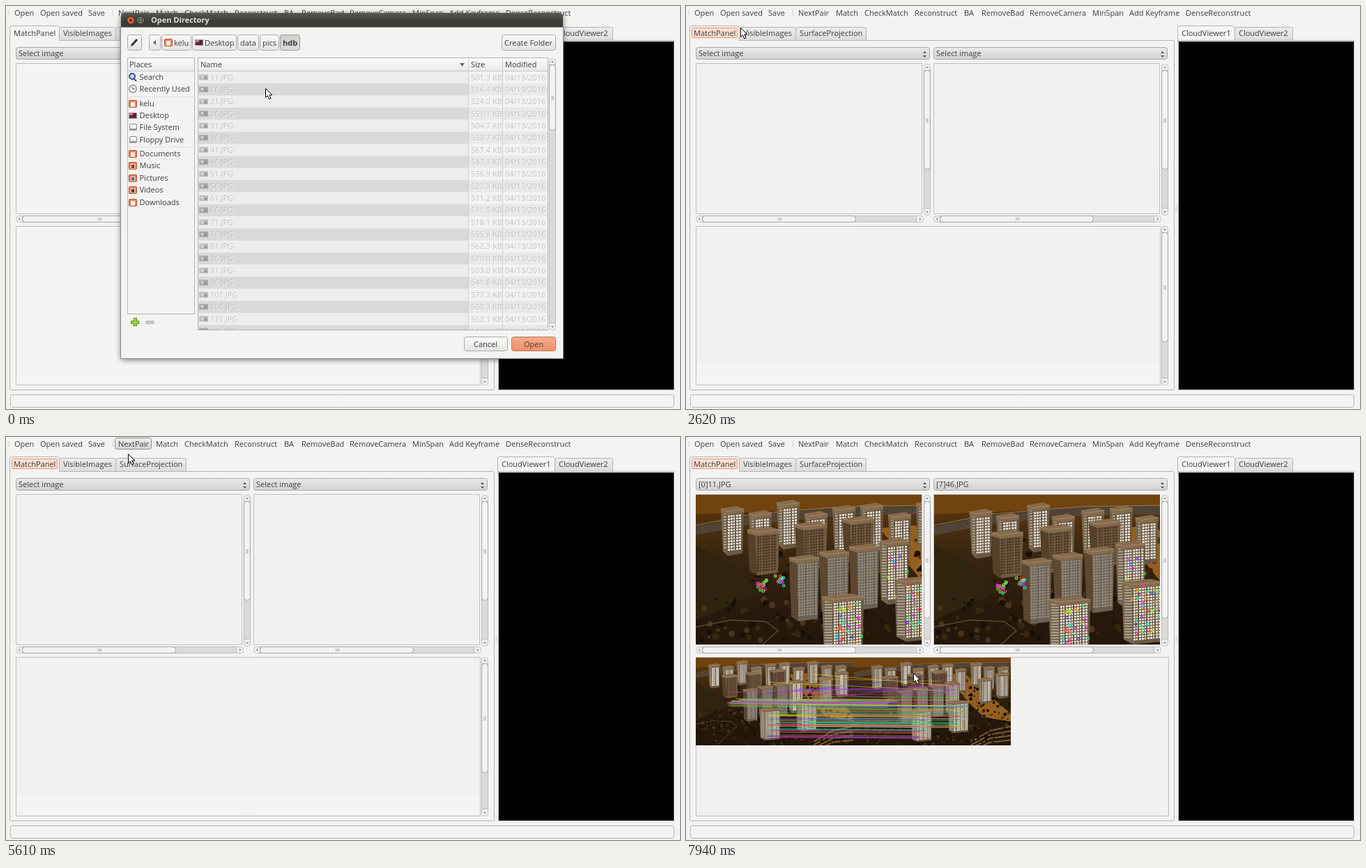
An HTML page with a canvas for the animation above (8 s loop, 967 by 579 pixels).

```html
<!DOCTYPE html>
<html lang="en">
<head>
<meta charset="utf-8">
<title>Match panel</title>
<style>
html, body { margin: 0; width: 100%; height: 100%; overflow: hidden; background: #f4f3f2; }
canvas { display: block; }
</style>
</head>
<body>
<canvas id="stage" width="967" height="579"></canvas>
<script>
const LOOP = 8000, TICK = 135.7;
const PRESSED = 870, OPENED = 1530, LOADED = 5740, MATCHED = 7360;
const main = document.getElementById('stage').getContext('2d');
let g = main;

// --- drawing helpers -------------------------------------------------------
function random(seed) {
  return () => (seed = (seed * 16807) % 2147483647) / 2147483647;
}
function fill(x, y, w, h, color) {
  g.fillStyle = color;
  g.fillRect(x, y, w, h);
}
function path(p) {
  g.beginPath();
  for (let i = 0; i < p.length; i += 2) g.lineTo(p[i], p[i + 1]);
}
function poly(color, ...p) {
  path(p);
  g.fillStyle = color;
  g.fill();
}
function stroke(color, width, ...p) {
  path(p);
  g.strokeStyle = color;
  g.lineWidth = width;
  g.stroke();
}
function disc(x, y, r, color) {
  g.beginPath();
  g.arc(x, y, r, 0, 7);
  g.fillStyle = color;
  g.fill();
}
function shade(y0, y1, ...colors) {
  const s = g.createLinearGradient(0, y0, 0, y1);
  colors.forEach((c, i) => s.addColorStop(i / (colors.length - 1), c));
  return s;
}
function box(x0, y0, x1, y1, color, line, r = 0) {
  g.beginPath();
  g.roundRect(x0 + .5, y0 + .5, x1 - x0 - 1, y1 - y0 - 1, r);
  if (color) { g.fillStyle = color; g.fill(); }
  if (line) { g.strokeStyle = line; g.lineWidth = 1; g.stroke(); }
}
function clip(x, y, w, h, paint) {
  g.save();
  g.beginPath();
  g.rect(x, y, w, h);
  g.clip();
  paint();
  g.restore();
}
const font = weight => g.font = weight + ' 11px "Open Sans", "Noto Sans", sans-serif';
function width(s, weight = 400) {
  font(weight);
  return Math.round(g.measureText(s).width);
}
// y is the middle of the line
function text(s, x, y, color = '#3c3c3c', weight = 400) {
  font(weight);
  g.fillStyle = color;
  g.fillText(s, x, y + 4);
}
function button(x0, y0, x1, y1, top = '#fbfbfa', end = '#e4e3e1', line = '#aaa8a5') {
  box(x0, y0, x1, y1, shade(y0, y1, top, end), line, 3);
}
function header(x, w) {
  fill(x, 75, w, 19, shade(75, 94, '#fbfbfa', '#e9e8e6'));
  fill(x, 93, w, 1, '#c8c6c3');
}
// scroll bar of the given length, thumb from a to b
function bar(x, y, length, a, b, upright) {
  const part = (u, lu, ...style) => upright
    ? box(x, y + u, x + 10, y + u + lu, ...style)
    : box(x + u, y, x + u + lu, y + 10, ...style);
  const arrow = (u, d) => upright
    ? poly('#777', x + 3, y + u, x + 7, y + u, x + 5, y + u + d)
    : poly('#777', x + u, y + 3, x + u, y + 7, x + u + d, y + 5);
  part(0, length, '#efeeec', '#c3c1be', 4);
  part(9, length - 19, '#dcdad8', '#bfbdba');
  part(a, b - a, '#f3f2f0', '#a5a3a0', 4);
  for (const k of [-2, 0, 2]) {
    const m = Math.round((a + b) / 2) + k;
    upright ? fill(x + 3, y + m, 4, 1, '#aaa') : fill(x + m, y + 3, 1, 4, '#aaa');
  }
  arrow(6, -2);
  arrow(length - 6, 2);
}

// --- pointer: straight runs between key points, seen once per tick ----------
const route = [
  [0, 372, 118], [1, 655, 472], [5, 768, 483], [12, 768, 483], [14, 212, 300], [19, 78, 31],
  [25, 38, 10], [26, 38, 10], [27, 68, 11], [32, 178, 10], [40, 178, 10], [41, 175, 24],
  [42, 226, 169], [45, 214, 32], [47, 232, 9], [55, 232, 9], [58, 326, 339]
];
function place(tick) {
  const i = route.findIndex(p => p[0] >= tick);
  if (i < 1) return (i ? route[route.length - 1] : route[0]).slice(1);
  const [t0, x0, y0] = route[i - 1], [t1, x1, y1] = route[i], k = (tick - t0) / (t1 - t0);
  return [Math.round(x0 + (x1 - x0) * k), Math.round(y0 + (y1 - y0) * k)];
}
function arrow([x, y]) {
  g.save();
  g.translate(x + .5, y + .5);
  path([0, 0, 0, 13, 3, 10.3, 5.2, 15.5, 7.6, 14.5, 5.4, 9.4, 9.4, 9.4]);
  g.closePath();
  g.fillStyle = '#fff';
  g.fill();
  g.strokeStyle = '#000';
  g.lineWidth = 1;
  g.stroke();
  g.restore();
}

// --- model town, seen from two places ---------------------------------------
const TOWN_W = 448, TOWN_H = 250, SMALL = 226 / TOWN_W;
const rows = [
  { x: 36, y: 16, dx: 40, dy: 0, w: 33, h: 72, n: 10, look: 'lit' },
  { x: 74, y: 46, dx: 68, dy: -8, w: 46, h: 70, n: 3, look: 'brown' },
  { x: 350, y: 52, dx: 45, dy: -15, w: 40, h: 76, n: 2, look: 'lit' },
  { x: 134, y: 86, dx: 43, dy: -8, w: 43, h: 96, n: 4, look: 'grey' },
  { x: 181, y: 142, dx: 104, dy: -25, w: 60, h: 94, n: 2, look: 'lit' }
];
const looks = {
  brown: { wall: '#705a41', glass: '#4a3420', edge: '#55402a' },
  lit: { wall: '#6a5a45', glass: '#efece2', edge: '#75664f' },
  grey: { wall: '#6b6152', glass: '#938d80', edge: '#5c4730' }
};
const towers = rows.flatMap(r => Array.from({ length: r.n }, (_, i) => ({
  x: r.x + i * r.dx, y: r.y + i * r.dy + (r.n > 4 ? 9 * Math.sin(i * 2.4) : 0),
  w: r.w, h: r.h, look: r.x + i * r.dx > 250 ? 'lit' : r.look
})));
// nearer things slide left, farther things slide right
const shift = base => Math.max(-17, 13 - .25 * (base - 95));

function tower(x, y, { w, h, look }) {
  const { wall, glass, edge } = looks[look], side = Math.round(w * .25);
  poly(edge, x, y + 5, x + side, y + 10, x + side + 2, y + h, x + 3, y + h - 7);
  poly(wall, x + side, y + 10, x + w, y + 7, x + w - 2, y + h - 4, x + side + 2, y + h);
  for (let j = 14; j < h - 6; j += 4) {
    for (let i = side + 2; i < w - 4; i += 4) fill(x + i, y + j - (i - side) * .1, i % 3 ? 3 : 2, 2.6, glass);
    if (look == 'lit') fill(x + 4, y + j - 3, side - 4, 1.5, '#b8b1a0');
  }
  poly('#866b4c', x, y + 4, x + w * .7, y, x + w, y + 4, x + w, y + 9, x + side, y + 13, x, y + 9);
  stroke('#a08a6b', 1, x, y + 4, x + side, y + 8, x + w, y + 4);
}
function town(second) {
  const c = document.createElement('canvas'), rnd = random(77);
  const slide = base => second ? shift(base) : 0;
  c.width = TOWN_W;
  c.height = TOWN_H;
  g = c.getContext('2d');
  fill(0, 0, TOWN_W, TOWN_H, shade(0, TOWN_H, '#5e390d', '#3a2710', '#27190b', '#22160a'));
  poly('#70430f', 0, 0, TOWN_W, 0, TOWN_W, 14, 200, 20, 0, 28);
  stroke('#4f4436', 12, 0, 52, 80, 36, 210, 24, TOWN_W, 20);
  stroke('#8d7a5f', 1, 0, 44, 80, 28, 210, 17, TOWN_W, 13);
  poly('#2f2410', 0, 72, 45, 95, 90, 140, 0, 180);
  poly('#94601f', 264, 48, 315, 44, TOWN_W, 160, TOWN_W, 182, 372, 170, 325, 125);
  for (let i = 0; i < 4; i++)
    stroke('#7d5c3a', 4, 335, 240 + i * 9, 390, 208 + i * 11, TOWN_W, 196 + i * 13);
  for (let i = 0; i < 420; i++) {
    const x = rnd() * TOWN_W, y = 62 + rnd() * 188, r = 1.5 + rnd() * 3.5;
    if (x > 80 || y > 150)
      disc(x + slide(y), y, r, ['#1a1108', '#38260f', '#4b341b', '#151009'][i % 4]);
  }
  stroke('#5b4730', 1.5, 0, 190, 50, 180, 100, 182, 118, 195, 96, 215, 60, 250);
  for (const t of towers) tower(t.x + slide(t.y + t.h), t.y + (second ? 4 : 0), t);
  g = main;
  return c;
}
const views = [town(false), town(true)];

// matched points lie on two bushes and on the fronts of the nearest towers
const rnd = random(4321);
const bushes = [{ x: 88, y: 122, w: 16, h: 17 }, { x: 114, y: 116, w: 14, h: 15 }];
const fronts = towers.slice(-3).map(t => ({ x: t.x + t.w * .3, y: t.y + 14, w: t.w * .65, h: t.h - 20 }));
const matches = [...bushes, ...fronts].flatMap((s, i) => Array.from({ length: [18, 14, 8, 34, 34][i] }, () => {
  const x = s.x + rnd() * s.w, y = s.y + rnd() * s.h;
  return { x, y, x2: x + shift(s.y + s.h), y2: y + 3, color: `hsl(${rnd() * 360 | 0} 75% 55%)` };
}));
// a few wrong pairs cross the picture
const strays = Array.from({ length: 10 }, () => {
  const a = matches[rnd() * matches.length | 0];
  return { ...a, y: 45 + rnd() * 90, x2: rnd() * 380, y2: 45 + rnd() * 110 };
});

function ring(x, y, color) {
  g.beginPath();
  g.arc(x, y, 1.7, 0, 7);
  g.strokeStyle = color;
  g.lineWidth = 1.3;
  g.stroke();
}
function pictures(matched) {
  [14, 356].forEach((x, i) => {
    clip(x, 83, 324, 215, () => {
      g.drawImage(views[i], x, 83);
      if (matched) for (const m of matches) ring(x + (i ? m.x2 : m.x), 83 + (i ? m.y2 : m.y), m.color);
    });
    g.drawImage(views[i], 14 + 226 * i, 317, 226, 126);
  });
  if (!matched) return;
  g.globalAlpha = .8;
  for (const m of [...matches, ...strays])
    stroke(m.color, .7, 14 + m.x * SMALL, 317 + m.y * SMALL, 240 + m.x2 * SMALL, 317 + m.y2 * SMALL);
  g.globalAlpha = 1;
}

// --- main window -------------------------------------------------------------
const tools = {
  'Open': 12, 'Open saved': 49, 'Save': 118, 'NextPair': 161, 'Match': 215, 'CheckMatch': 256,
  'Reconstruct': 328, 'BA': 399, 'RemoveBad': 424, 'RemoveCamera': 493, 'MinSpan': 583,
  'Add Keyframe': 636, 'DenseReconstruct': 717
};
// a tool lights up one tick after the pointer enters and sinks once it rests
function toolbar(tick) {
  const [px, py] = place(tick - 1);
  const resting = String(place(tick)) == String(place(tick - 2));
  for (const y of [6, 9, 12]) for (const x of [3, 152]) fill(x, y, 2, 1, '#c9c7c4');
  for (const [name, x] of Object.entries(tools)) {
    const x0 = x - 5, x1 = x + width(name) + 4;
    if (py < 21 && px >= x0 && px < x1)
      button(x0, 1, x1, 18, resting ? '#cfcdca' : '#f0efed', '#d6d4d1', '#8f8d8a');
    text(name, x, 10);
  }
}
function tab(label, x0, x1, active) {
  const y = active ? 28 : 30;
  box(x0, y, x1, 54, active ? '#f5f4f3' : shade(30, 50, '#eeedeb', '#dddbd9'), '#b5b3b0', 3);
  text(label, x0 + 6, active ? 38.5 : 39);
}
function combo(x, label) {
  button(x, 59, x + 336, 77, '#ebeae8', '#d3d1cf');
  text(label, x + 4, 68);
  poly('#555', x + 326, 68, x + 331, 68, x + 328.5, 65);
  poly('#555', x + 326, 71, x + 331, 71, x + 328.5, 74);
}
function mainWindow(t, tick) {
  const loaded = t >= LOADED, opened = t >= OPENED, pane = opened ? '#f2f1ef' : '#f5f4f3';
  fill(0, 0, 967, 579, '#f4f3f2');
  toolbar(tick);
  tab('VisibleImages', 76, 158);
  tab('SurfaceProjection', 157, 259);
  tab('CloudViewer2', 787, 871);
  tab('MatchPanel', 5, 77, true);
  tab('CloudViewer1', 705, 788, true);
  box(5, 49, 701, 552, '#f4f3f2', '#b5b3b0', 2);
  fill(6, 48, 70, 3, '#f5f4f3');
  if (opened) {
    box(8, 31, 74, 46, '#f8dfd5', '#e8906f', 1);
    text('MatchPanel', 11, 38.5);
  }
  box(706, 49, 959, 552, '#f4f3f2', '#b5b3b0');
  fill(707, 51, 251, 500, '#000');
  box(6, 558, 959, 577, '#f4f3f2', '#b5b3b0', 3);
  for (const y of [287, 290, 293]) fill(702, y, 3, 1, '#c5c3c0');

  combo(14, loaded ? '[0]11.JPG' : 'Select image');
  combo(355, loaded ? '[7]46.JPG' : 'Select image');
  for (const x of [14, 355]) {
    box(x, 82, x + 325, 299, pane, '#c1bfbc');
    bar(x + 327, 83, 218, 9, loaded ? 178 : 152, true);
    bar(x, 301, 327, 9, 230);
  }
  box(14, 316, loaded ? 693 : 681, 545, pane, '#c1bfbc');
  if (loaded) pictures(t >= MATCHED);
  else {
    if (opened) fill(15, 514, 665, 30, '#f5f4f2');
    bar(682, 316, 229, 9, 167, true);
  }
}

// --- dialog --------------------------------------------------------------------
const folder = mark => (x, y) => {
  box(x, y - 5, x + 12, y + 6, '#e8875c', '#b8562c', 1);
  box(x + 3, y - 2, x + 9, y + 5, mark, '#f6d9c8');
};
const home = folder('#fff');
function desktop(x, y) {
  box(x, y - 4, x + 12, y + 5, '#5a2348', '#999');
  fill(x + 1, y - 3, 5, 3, '#d77a6a');
}
function drive(x, y) {
  box(x + 1, y - 5, x + 12, y + 5, '#f0f0ee', '#888', 1);
  fill(x + 1, y + 2, 10, 3, '#9a9a98');
}
function lens(x, y) {
  stroke('#555', 2, x + 7, y + 2, x + 11, y + 6);
  disc(x + 5, y - 1, 5, '#2f4f8f');
  disc(x + 5, y - 1, 3, '#c8d8ee');
}
function clock(x, y) {
  disc(x + 6, y, 6, '#888');
  disc(x + 6, y, 4.6, '#f4f4f2');
  stroke('#444', 1, x + 4, y - 3, x + 6, y, x + 9, y);
}
const places = {
  'Search': lens, 'Recently Used': clock,
  'kelu': home, 'Desktop': desktop, 'File System': drive, 'Floppy Drive': drive,
  'Documents': folder('#f4efe9'), 'Music': folder('#5c4a40'), 'Pictures': folder('#4e6f9a'),
  'Videos': folder('#444'), 'Downloads': home
};
const crumbs = { 'kelu': home, 'Desktop': desktop, 'data': null, 'pics': null, 'hdb': null };
const ROW = 17.35;

function faint(s, x, y, color = '#c0bfbd') {
  text(s, x + 1, y + 1, '#fafafa');
  text(s, x, y, color);
}
function files() {
  const size = random(2016);
  box(275, 74, 778, 466, '#f1f0ef', '#b5b3b0');
  clip(276, 75, 501, 390, () => {
    for (let i = 0; i < 22; i++) {
      const y = 94 + i * ROW, mid = y + 8.5, odd = i % 2;
      fill(276, y, 388, ROW, odd ? '#dad9d8' : '#eeedec');
      fill(664, y, 114, ROW, odd ? '#e9e8e7' : '#f3f2f1');
      fill(277, mid - 4, 13, 8, odd ? '#a9a9a7' : '#bebdbb');
      fill(280, mid - 2, 3, 3, '#dcdcda');
      fill(285, mid - 1, 3, 4, '#929290');
      faint(11 + i * 5 + '.JPG', 293, mid, odd ? '#bab9b7' : '#bfbebc');
      faint((500 + size() * 80).toFixed(1) + ' KB', 667, mid);
      faint('04/13/2016', 716, mid);
    }
    header(276, 501);
    for (const x of [663, 712]) fill(x, 75, 1, 390, '#cfcdca');
  });
  text('Name', 279, 84);
  text('Size', 667, 84);
  text('Modified', 716, 84);
  poly('#666', 651, 82, 658, 82, 654.5, 87);
  bar(779, 75, 391, 9, 104, true);
}
function titleBar() {
  g.save();
  g.shadowColor = 'rgba(0,0,0,.55)';
  g.shadowBlur = 9;
  g.shadowOffsetY = 2;
  g.beginPath();
  g.roundRect(165, 10, 634, 496, [5, 5, 0, 0]);
  g.fillStyle = shade(10, 31, '#575650', '#403f3a', '#3a3934');
  g.fill();
  g.restore();
  fill(165, 31, 634, 475, '#f4f3f2');
  box(164, 30, 800, 507, null, '#8b8986');
  for (const [x, color] of [[179, '#e5603a'], [193, '#7b7a73']]) {
    disc(x, 20.5, 6, '#2c2b28');
    disc(x, 20.5, 5, color);
  }
  stroke('#5b2413', 1.4, 177, 18.5, 181, 22.5);
  stroke('#5b2413', 1.4, 181, 18.5, 177, 22.5);
  box(190, 18, 196, 23, null, '#3a3934');
  text('Open Directory', 208, 20, '#e4e0d8', 700);
}
function pathBar() {
  button(174, 41, 195, 64);
  stroke('#333', 3, 180, 57, 188, 48);
  stroke('#aaa', 1, 178, 59, 181, 56);
  button(205, 41, 222, 64);
  poly('#666', 211, 52.5, 215, 49, 215, 56);
  let x = 223;
  for (const [label, icon] of Object.entries(crumbs)) {
    const last = label == 'hdb', weight = last ? 700 : 400;
    const start = x + (icon ? 18 : 4), end = start + width(label, weight) + 4;
    button(x, 41, end, 64, ...(last ? ['#d2d0cd', '#dddbd8', '#999794'] : []));
    if (icon) icon(x + 4, 52);
    text(label, start, 52.5, '#3c3c3c', weight);
    x = end + 1;
  }
  button(711, 41, 789, 64);
  text('Create Folder', 715, 52.5);
}
function placesPane() {
  box(174, 74, 271, 443, '#f4f3f2', '#b5b3b0');
  header(175, 95);
  text('Places', 177, 84);
  Object.entries(places).forEach(([label, icon], i) => {
    const y = Math.round(102 + ROW * i + 3 * (i > 1) + 3 * (i > 5));
    icon(176, y);
    text(label, 191.5, y);
  });
  for (const y of [130, 202]) fill(176, y, 93, 1, '#e2e0dd');
  fill(183, 448, 5, 12, '#5f9a1c');
  fill(179, 452, 12, 5, '#5f9a1c');
  fill(184, 449, 3, 10, '#9bd04a');
  fill(180, 453, 10, 3, '#9bd04a');
  box(200, 452, 213, 457, '#c9c8c6', '#bdbcba', 1);
}
function dialog(pressed) {
  titleBar();
  pathBar();
  placesPane();
  files();
  button(657, 475, 720, 496);
  text('Cancel', 671, 485.5);
  button(725, 475, 789, 496, pressed ? '#ee9673' : '#f6ac8f', pressed ? '#f0956f' : '#ee8f69', '#b9765c');
  text('Open', 743, 485.5);
}

// --- loop ------------------------------------------------------------------------
const start = performance.now();
function draw() {
  const t = (performance.now() - start) % LOOP, tick = Math.floor(t / TICK);
  mainWindow(t, tick);
  if (t < OPENED) dialog(t >= PRESSED);
  arrow(place(tick));
  requestAnimationFrame(draw);
}
draw();
</script>
</body>
</html>
```
